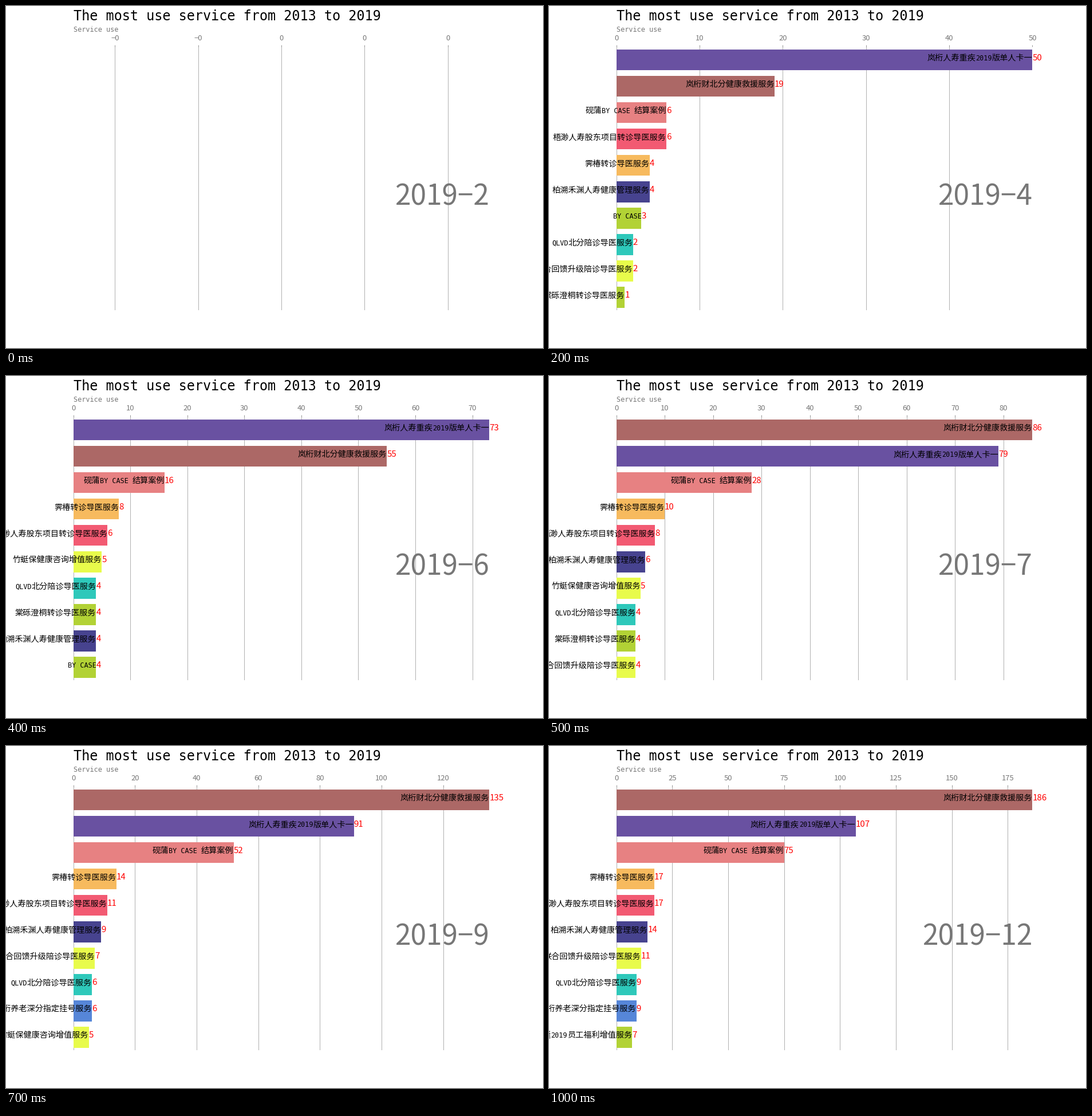
These frames come from a looping animation (938x597 px, 1.1 s). A matplotlib script:

```python
from itertools import groupby

import numpy as np
import matplotlib.pyplot as plt
from matplotlib.animation import FuncAnimation

W, H, DPI = 938, 597, 72  # at 72 dpi one point is one pixel
LEFT, RIGHT, TOP, BOTTOM = 117.6, 844.4, 71.15, 531.05
ROWS = 10
EM = 14.15                # label grid: full cell for CJK, half for Latin
CJK, MONO = "Noto Sans CJK JP", "DejaVu Sans Mono"
MONO_WIDTH = 0.602
GRAY = "#777777"
LIME, YELLOW = "#b2d235", "#e8fb4b"

# name, colour, running total at a few months; it grows evenly in between
SERVICES = [
    ("岚桁人寿重疾2019版单人卡一", "#6951a1", {3: 36, 5: 65, 6: 73, 10: 98, 12: 107}),
    ("岚桁财北分健康救援服务", "#ac6866", {4: 19, 6: 55, 8: 118, 10: 153, 12: 186}),
    ("砚蒲BY CASE 结算案例", "#e78182", {3: 1, 6: 16, 10: 64, 12: 75}),
    ("霁椿转诊导医服务", "#f7ba5e", {3: 2, 9: 14, 12: 17}),
    ("梧渺人寿股东项目转诊导医服务", "#f25a72", {4: 6, 6: 6, 8: 10, 12: 17}),
    ("竹蜓保健康咨询增值服务", YELLOW, {6: 5}),
    ("QLVD北分陪诊导医服务", "#2ec8ba", {4: 2, 6: 4, 12: 9}),
    ("棠砾澄桐转诊导医服务", LIME, {4: 1, 6: 4}),
    ("柏溯禾渊人寿健康管理服务", "#47438f", {4: 4, 6: 4, 8: 9, 10: 10, 12: 14}),
    ("联合回馈升级陪诊导医服务", YELLOW, {3: 2, 8: 5, 10: 10, 12: 11}),
    ("BY CASE", LIME, {3: 3, 6: 4}),
    ("岚桁养老深分指定挂号服务", "#5686d8", {8: 4, 10: 8, 12: 9}),
    ("竹蜓2019员工福利增值服务", LIME, {10: 6, 12: 7}),
]
SINGLES = ["岚桁人寿境内健康救援服务", "苔禾对症预约陪诊服务",
           "棠砾澄桐转诊导医服务    ", "榆汀清越健康服务卡", "岚桁人寿转诊导医服务"]
SERVICES += [(name, LIME, {3: 1}) for name in SINGLES]

plt.rcParams["font.family"] = CJK
fig = plt.figure(figsize=(W / DPI, H / DPI), dpi=DPI, facecolor="white")
ax = fig.add_axes([LEFT / W, 1 - BOTTOM / H, (RIGHT - LEFT) / W, (BOTTOM - TOP) / H])


def put(x, y, text, **style):
    """Text with its baseline at a pixel position from the top left."""
    return fig.text(x / W, 1 - y / H, text, **style)


def mono_size(em):
    return em / 2 / MONO_WIDTH


def note(text, value, row, dx, **style):
    ax.annotate(text, (value, row), (dx, -1), textcoords="offset points",
                annotation_clip=False, **style)


def label(name, value, row):
    """Name ending at the bar's tip, Latin runs set in half cells."""
    dx = 0
    runs = [(latin, "".join(run)) for latin, run in groupby(name, str.isascii)]
    for latin, run in reversed(runs):
        dx -= len(run) * EM / (2 if latin else 1)
        if run.strip():
            note(run, value, row, dx, family=MONO if latin else CJK,
                 size=mono_size(EM) if latin else EM)


def total(points, month):
    return int(np.interp(month, list(points), list(points.values()), left=0))


def ranking(month):
    """Top rows as (name, colour, total); ties keep the list order."""
    totals = [(name, color, total(points, month)) for name, color, points in SERVICES]
    return sorted(totals, key=lambda t: -t[2])[:ROWS]


def draw(i):
    month = i + 2
    ax.clear()
    if month > 2:
        top = ranking(month)
        ax.barh(range(ROWS), [t[2] for t in top], color=[t[1] for t in top])
        for row, (name, _, value) in enumerate(top):
            label(name, value, row)
            note(str(value), value, row, 0, color="red", size=15)
        ax.set_xlim(0, top[0][2])
    else:
        ax.set_xlim(-0.05, 0.05)
    ax.set_ylim(ROWS - 0.502, -0.498)
    ax.set_yticks([])
    ax.xaxis.set_ticks_position("top")
    ax.xaxis.set_major_formatter("{x:,.0f}")
    ax.tick_params(axis="x", colors=GRAY, labelsize=13, length=3.5, pad=4.5)
    ax.grid(axis="x", linestyle="-", linewidth=1)
    ax.set_axisbelow(True)
    ax.set_frame_on(False)
    date.set_text(f"2019\u2212{month}")


put(117.5, 25, "The most use service from 2013 to 2019",
    family=MONO, size=mono_size(28.35))
put(117.5, 45, "Service use", family=MONO, size=mono_size(EM), color=GRAY)
date = put(844, 347, "", ha="right", size=49.5, color=GRAY)

anim = FuncAnimation(fig, draw, frames=11, interval=100, repeat=True)
plt.show()
```
